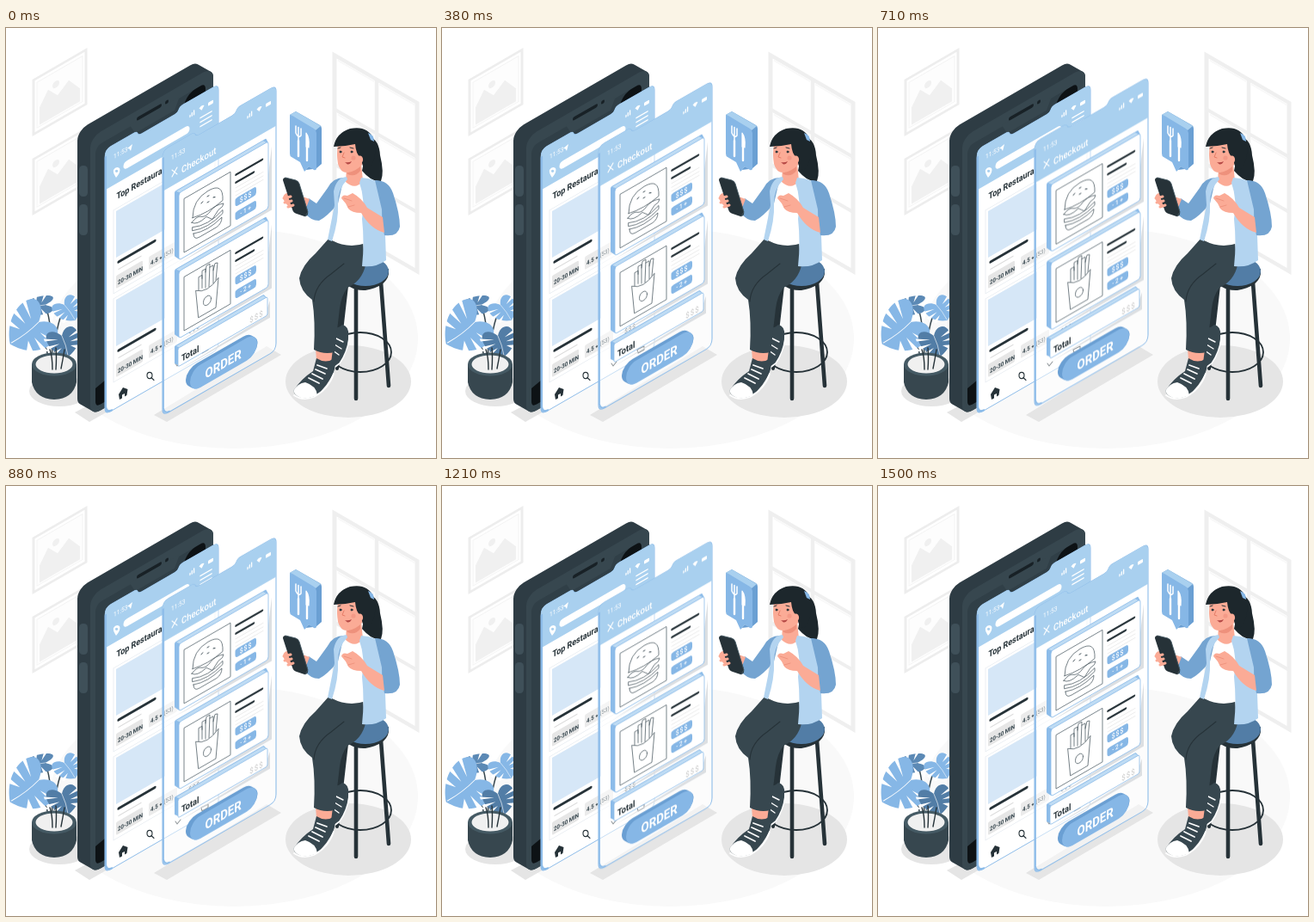
An HTML page for the animation above (1.54 s loop, 500 by 500 pixels).

```html
<!DOCTYPE html>
<html lang="en">
<head>
<meta charset="utf-8">
<title>Food order</title>
<style>
html, body { margin: 0; width: 100%; height: 100%; overflow: hidden; background: #fff; }
svg { display: block; width: 100vw; height: 100vh; }
text { font-family: Roboto, "Open Sans", sans-serif; }
.b { font-weight: 700; }
.m { font-weight: 500; }
.ln { fill: none; stroke-linecap: round; stroke-linejoin: round; }
.iso { transform: skewY(-30deg); }
.wall { transform: skewY(30deg); }
.float { animation: float 1540ms linear infinite; }
@keyframes float {
  0%, 97.2%, 100% { transform: translateY(0); }
  48.1% { transform: translateY(-10px); }
}
</style>
</head>
<body>
<svg viewBox="0 0 500 500">
<defs>
  <path id="shell" d="M115 217Q115 208 122 208H149Q152 208 153 211T158 214H196Q200 214 201 211T206 208H240Q247 208 247 215V508Q247 516 240 516H122Q115 516 115 508Z"/>
  <path id="head" d="M115 255V217Q115 208 122 208H149Q152 208 153 211T158 214H196Q200 214 201 211T206 208H240Q247 208 247 215V255Z"/>
  <g id="status">
    <text transform="matrix(.866 -.5 0 1 125 152.5)" font-size="7.6" fill="#fff">11:53</text>
    <g class="iso">
      <path d="M214 227V225M216.3 227V223.5M218.6 227V222" class="ln" stroke="#fff" stroke-width="1.3"/>
      <path d="M224.5 223Q227.5 220 230.5 223L227.5 227Z" fill="#fff"/>
      <rect x="235" y="222.5" width="6" height="4" rx="1" fill="#fff"/>
    </g>
  </g>
  <g id="place">
    <rect x="125" y="284" width="118" height="97" fill="#fff" stroke="#e6ebf0" stroke-width=".8"/>
    <rect x="128" y="287" width="57" height="54" fill="#d6e7f7"/>
    <path d="M131 347.5H173" class="ln" stroke="#263238" stroke-width="3.2"/>
    <path d="M131 356H157" class="ln" stroke="#dcdcdc" stroke-width="1.3"/>
    <rect x="128" y="362" width="31" height="15" rx="1.5" fill="#e6e6e6"/>
    <rect x="166" y="362" width="33" height="15" rx="1.5" fill="#ebebeb"/>
  </g>
  <g id="tags" fill="#37474f" font-size="7">
    <text class="b" transform="matrix(.866 -.5 0 1 130 298.5)">20-30 MIN</text>
    <text class="b" transform="matrix(.866 -.5 0 1 168 276)">4.5</text>
    <text transform="matrix(.866 -.5 0 1 178 270)" font-size="5">★</text>
    <text class="m" transform="matrix(.866 -.5 0 1 183.5 267)">(53)</text>
    <text transform="matrix(.866 -.5 0 1 213 352.5)" font-size="0"/>
  </g>
  <g id="card">
    <path d="M199 390H309V316L300 384Z" fill="#dcdfe2"/>
    <path d="M198 305H301L303 310V384H203L198 378Z" fill="#8dbce9" stroke="#8dbce9" stroke-width="4" stroke-linejoin="round"/>
    <path d="M198 304H299L304 309H203Z" fill="#bfdcf4"/>
    <rect x="201" y="308" width="104" height="78" rx="3" fill="#fff" stroke="#8dbce9" stroke-width=".7"/>
    <rect x="207" y="318" width="54" height="62.5" fill="#fff" stroke="#56656d" stroke-width=".7"/>
    <g class="ln">
      <path d="M267.5 325H298M267.5 334H288" stroke="#263238" stroke-width="2.5"/>
      <path d="M267 340H299M267 344.5H299M267 349H299" stroke="#e6e6e6" stroke-width=".9"/>
    </g>
    <rect x="266.500" y="352" width="24.500" height="10" rx="3" fill="#86b7e6"/>
    <rect x="266.500" y="368" width="24.500" height="10" rx="3" fill="#86b7e6"/>
  </g>
  <text id="price" class="m" font-size="8" text-anchor="middle" letter-spacing="1">$$$</text>
  <g id="leaf">
    <path d="M0 0C-9 -15 -27 -20 -30 -3C-32 14 -20 29 -2 38C18 32 32 18 30 2C28 -14 10 -16 0 0Z"/>
    <path d="M0 0Q2 18 -2 36" class="ln" stroke="#fff" stroke-width=".9"/>
    <path d="M-34 -6L-9 4L-34 -1ZM-35 9L-9 12L-34 15ZM-29 23L-8 20L-25 29ZM34 -2L11 6L34 4ZM34 12L11 14L32 18ZM25 25L9 21L19 31Z" fill="#fff"/>
  </g>
  <g id="picture">
    <path d="M32 79H93V142H32Z" fill="#fff" stroke="#ededed" stroke-width="3"/>
    <path d="M36 84H89V137H36Z" fill="#fdfdfd" stroke="#f4f4f4"/>
    <path d="M39 135V115L49 100L60 113L73 103L86 120V135Z" fill="#f0f0f0"/>
    <circle cx="58" cy="99" r="4" fill="#f0f0f0"/>
  </g>
</defs>

<!-- room -->
<ellipse cx="265" cy="361" rx="214" ry="128" fill="#f9f9f9"/>
<g class="iso"><use href="#picture"/><use href="#picture" y="92"/></g>
<g class="wall" fill="none" stroke="#efefef">
  <path d="M382 -189H478V7H382Z" stroke-width="5"/>
  <path d="M431 -188V6M382 -126H478M382 -62H478" stroke-width="4.5"/>
  <path d="M386 -185H428M434 -185H475M386 -122H428M434 -122H475" stroke="#f8f8f8" stroke-width="2"/>
</g>
<g fill="#e5e5e5">
  <ellipse cx="62" cy="422" rx="35" ry="18"/>
  <ellipse cx="398" cy="411" rx="73" ry="42"/>
  <path d="M80 447L97 458L190 405L172 398ZM172 450L187 458L320 380L303 370Z"/>
</g>

<!-- plant -->
<path d="M54 396Q54 345 46 323M56 394Q56 345 69 324M50 394Q49 368 36 352M61 394Q62 378 70 364" class="ln" stroke="#37474f" stroke-width="1.5"/>
<use href="#leaf" transform="translate(45 322) rotate(82) scale(.36 .8)" fill="#5b89b5"/>
<use href="#leaf" transform="translate(68 322) rotate(-38) scale(.52 .58)" fill="#86b7e6"/>
<use href="#leaf" transform="translate(38 342) rotate(50) scale(.96 1.1)" fill="#86b7e6"/>
<use href="#leaf" transform="translate(65 358) rotate(-20) scale(.62 .66)" fill="#527da6"/>
<path d="M30 391V412Q34 431 56 432Q78 431 82 412V391Z" fill="#37474f"/>
<ellipse cx="56" cy="391" rx="26" ry="13.5" fill="#455a64"/>
<ellipse cx="56" cy="391" rx="21.500" ry="10.500" fill="#f0f0f0"/>
<path d="M54 397Q54 382 51 374M58 397Q59 382 58 372M64 396Q66 386 68 374" class="ln" stroke="#263238" stroke-width="1.4"/>

<!-- phone -->
<g class="iso">
  <path d="M95 179H214L229 196V496H110L95 479Z" fill="#2e3c44" stroke="#2e3c44" stroke-width="24" stroke-linejoin="round"/>
  <rect x="98" y="184" width="143" height="324" rx="12" fill="#37474f"/>
  <rect x="104" y="198" width="128" height="303" rx="8" fill="#303f47"/>
  <path d="M220 198H226Q232 198 232 205V220H208V206Q213 198 220 198ZM104 479L116 476V501H110Q104 501 104 494Z" fill="#0d1215"/>
  <path d="M144 196H202L196 209H150Z" fill="#37474f"/>
  <path d="M154 194H179" class="ln" stroke="#182126" stroke-width="4"/>
  <circle cx="187" cy="194" r="2" fill="#182126"/>
</g>
<g fill="#3f5059">
  <rect x="85" y="160" width="10" height="36" rx="4.5"/>
  <rect x="85" y="205" width="10" height="36" rx="4.5"/>
</g>

<!-- list screen -->
<g class="iso">
  <use href="#shell" fill="#fff" stroke="#8dbce9" stroke-width="1"/>
  <use href="#head" fill="#a9d0ef"/>
  <path d="M116 217V508Q117 515 123 515.5" class="ln" stroke="#8dbce9" stroke-width="2.2"/>
  <path d="M141 240H209" class="ln" stroke="#fff" stroke-width="9"/>
  <path d="M226 235H239M226 240H239M226 245H239" class="ln" stroke="#fff" stroke-width="1.5"/>
  <use href="#place"/>
  <use href="#place" y="103"/>
</g>
<use href="#status"/>
<path d="M141 140L147 135L145 143L143.5 140.5Z" fill="#fff"/>
<path d="M128 174Q124 168 125 165Q128 160 132 163Q134 167 128 174Z" fill="#fff"/>
<circle cx="128.6" cy="166.3" r="1.6" fill="#a9d0ef"/>
<text class="b" transform="matrix(.866 -.5 0 1 128.5 199.5)" font-size="10.4" fill="#263238">Top Restaurants</text>
<use href="#tags"/>
<use href="#tags" y="103"/>
<use href="#price" transform="matrix(.8 -.46 0 .9 219 352)" fill="#37474f"/>
<path d="M131 426L136 418L141.5 420L140.5 427L138 428.5V425L135 426.5V430.5L132 432Z" fill="#263238"/>
<g class="ln" stroke="#263238" stroke-width="1.1">
  <ellipse cx="167" cy="404" rx="3" ry="3.6"/><path d="M169 406.5L172 409.5"/>
  <path d="M197 390L199 393L203 388M227 374L235 370V374L228 378Z"/>
</g>

<!-- checkout screen -->
<g class="float">
  <g transform="translate(67 1.3)">
    <g class="iso">
      <use href="#shell" fill="#fff" fill-opacity=".5" stroke="#8dbce9" stroke-width="1.1"/>
      <use href="#head" fill="#a9d0ef"/>
      <path d="M116 217V508Q117 515 123 515.5" class="ln" stroke="#8dbce9" stroke-width="1.8"/>
    </g>
    <use href="#status"/>
  </g>
  <path d="M193 165L199 170M193 173L199 162" class="ln" stroke="#fff" stroke-width="1.1"/>
  <text class="m" transform="matrix(.866 -.5 0 1 204 169)" font-size="11" fill="#fff">Checkout</text>
  <g class="iso">
    <use href="#card"/>
    <use href="#card" y="91"/>
    <g class="ln" stroke="#45545c" stroke-width=".65">
      <path d="M217 346Q217 325 235 325T252 346Q235 351 217 346ZM216 351Q222 346 228 351Q233 354 238 350T253 350Q253 354 247 354L240 361L233 354Q222 358 216 351ZM217 357Q235 366 252 357V361Q235 369 217 361ZM218 365Q235 372 251 365Q251 372 245 373H225Q218 373 218 365Z"/>
      <path d="M227 335L229 334M234 331L236 331M241 336L243 337M234 338L236 338" stroke-width="1"/>
      <path d="M224 434V419H228V434M228 423V414H232V436M232 418L233 411H237L236 437M237 415H241V436M241 421L243 414L246 415L244 434"/>
      <path d="M221 433Q234 444 247 433L244 466H224Z" fill="#fff"/>
      <ellipse cx="234" cy="452" rx="4.5" ry="5.2"/>
    </g>
    <path d="M199 514H307V494L300 510Z" fill="#dcdfe2"/>
    <path d="M197 484H299L303 490V508H202L197 503Z" fill="#8dbce9" stroke="#8dbce9" stroke-width="2" stroke-linejoin="round"/>
    <path d="M198 484H299L303 488.500H202Z" fill="#bfdcf4"/>
    <rect x="200" y="488" width="104" height="21.500" rx="2" fill="#fff" stroke="#8dbce9" stroke-width=".7"/>
    <path d="M221.500 530.500H276L280 535H225.500Z" fill="#6a9fd3" stroke="#6a9fd3" stroke-width="25" stroke-linejoin="round"/>
    <rect x="214" y="522" width="78" height="26.500" rx="12" ry="13.200" fill="#86b7e6"/>
  </g>
  <g fill="#fff">
    <use href="#price" transform="matrix(.866 -.5 0 1 279 199)"/>
    <use href="#price" transform="matrix(.866 -.5 0 1 279 290)"/>
    <g class="m" font-size="7.5" text-anchor="middle">
      <text transform="matrix(.866 -.5 0 1 278.5 214.500)">- 1 +</text>
      <text transform="matrix(.866 -.5 0 1 278.5 305.500)">- 2 +</text>
    </g>
    <text class="b" transform="matrix(.866 -.5 0 1 231.5 408)" font-size="15.4">ORDER</text>
  </g>
  <text class="b" transform="matrix(.866 -.5 0 1 204 388)" font-size="10.6" fill="#263238">Total</text>
  <use href="#price" transform="matrix(.98 -.566 0 1.13 291.5 338.5)" fill="#d4d4d4"/>
</g>

<!-- bubble -->
<path d="M330 101L337 97L365 113Q367 114 367 117V158L360 164Z" fill="#6a9fd3"/>
<path d="M330 101L337 97L366 114L360 119Z" fill="#a9d0ef"/>
<path d="M330 103Q330 100 333 102L358 117Q361 119 361 122V163Q361 166 358 165L352 161L347 167L342 156L332 150Q330 149 330 146Z" fill="#86b7e6"/>
<path d="M347 167L352 161L357 164L349 165Z" fill="#6a9fd3"/>
<g class="ln" stroke="#fff">
  <path d="M337 114V122Q340 129 343 125V117M340 115.5V149" stroke-width="1.5"/>
  <path d="M340 131V149" stroke-width="2.4"/>
  <path d="M349 122Q353 127 352 139L349 138Z" fill="#fff" stroke-width="1.2"/>
  <path d="M350 138V154" stroke-width="2.4"/>
</g>

<!-- stool -->
<g class="ln" stroke="#263238">
  <path d="M396 300L385 396" stroke-width="4"/>
  <ellipse cx="412" cy="377" rx="36" ry="23" stroke-width="1.800"/>
  <path d="M436 296L445 416M407 302V431" stroke-width="4.6"/>
</g>
<path d="M391 284V289Q397 306 418 305Q442 301 445 286V280Z" fill="#263238"/>
<ellipse cx="418" cy="283" rx="27" ry="17" fill="#527da6"/>

<!-- woman -->
<path d="M384 302L397 290L390 350L379 350Z" fill="#263238"/>
<path d="M379 348Q386 350 391 345Q399 347 398 357Q399 373 391 385Q386 395 379 395L374 378Z" fill="#37474f"/>
<path d="M399 361Q397 377 388 390L380 396" class="ln" stroke="#fff" stroke-width="1.6"/>
<path d="M384 361L392 365M382 368L390 373M380 375L387 380" class="ln" stroke="#fff" stroke-width="1.4"/>
<path d="M360 372L380 374L378 389Q368 392 361 387Z" fill="#fbab96"/>
<path d="M376 244Q396 254 415 249L418 276Q414 294 397 302Q390 311 388 326L382 377Q369 380 358 374Q360 340 356 316Q342 306 341 291Q344 276 360 262Z" fill="#37474f"/>
<path d="M358 318Q359 299 378 286L393 274" class="ln" stroke="#263238" stroke-width="1.1"/>
<path d="M334 422Q343 408 357 399L361 384Q372 391 382 384Q385 396 377 408Q368 424 355 430Q338 433 334 422Z" fill="#37474f"/>
<path d="M334 422Q339 413 348 412Q361 416 362 427Q340 436 334 422Z" fill="#fff"/>
<path d="M335 427Q345 434 358 429Q375 420 381 402" class="ln" stroke="#fff" stroke-width="1.8"/>
<path d="M352 407L364 413M356 402L368 408M360 397L371 402M362 392L373 396" class="ln" stroke="#fff" stroke-width="1.7"/>

<path d="M422 126Q434 130 435 148Q440 168 436 178Q426 180 414 166Z" fill="#1d272c"/>
<path d="M392 178L404 186L416 176L419 250Q398 257 379 247Q383 222 384 200Z" fill="#fff"/>
<path d="M396 162L413 157L415 178Q406 189 395 179Z" fill="#fbab96"/>
<path d="M396 166Q405 168 412 160L412 166Q406 174 397 170Z" fill="#ee917c"/>
<path d="M393 174Q380 174 374 186L361 204L352 198L346 214Q354 224 364 224Q374 219 386 204Z" fill="#74a4d1"/>
<path d="M396 173Q384 174 381 190L382 206L374 246L379 248Q387 224 386 204Q386 187 397 176Z" fill="#b3d4f0"/>
<path d="M413 174Q430 175 439 184L442 270Q430 279 414 277Q417 250 414 222Q418 200 411 180Z" fill="#b3d4f0"/>
<path d="M429 177Q445 177 450 192Q458 216 458 231Q456 243 440 241Q437 228 437 211Z" fill="#74a4d1"/>
<path d="M440 238Q424 234 413 215Q402 215 398 210L395 204L390 198Q391 193 397 195L403 192Q414 198 420 209L438 220Z" fill="#fbab96"/>
<path d="M393 198L402 201M398 208L405 206" class="ln" stroke="#ee917c" stroke-width=".9"/>
<path d="M322 197Q324 190 334 192L345 196L353 199L347 214L338 210Q325 209 322 197Z" fill="#fbab96"/>
<path d="M322 177Q322 174 325 174L337 177Q340 178 341 181L351 213Q352 219 347 219L338 216Q334 215 333 211Z" fill="#263238"/>
<path d="M325 174L337 177Q340 178 341 181L351 214L348 219" class="ln" stroke="#455a64" stroke-width=".9"/>
<path d="M323 198L331 196M324 203L332 201M328 208L334 206" class="ln" stroke="#fbab96" stroke-width="3"/>

<path d="M386 134Q384 147 386 158Q389 169 398 168Q408 166 415 158L414 134Z" fill="#fbab96"/>
<path d="M381 138Q384 122 400 117Q420 113 427 128Q433 144 425 160Q421 167 416 164L412 150Q407 147 406 135Q393 138 381 138Z" fill="#1d272c"/>
<ellipse cx="411.500" cy="153" rx="3.6" ry="4.6" fill="#fbab96"/>
<path d="M421 122Q428 124 428 132L424 130Z" fill="#86b7e6"/>
<g class="ln" stroke="#263238" stroke-width="1">
  <circle cx="389" cy="144" r="1" fill="#263238"/><circle cx="402" cy="144" r="1" fill="#263238"/>
  <path d="M386 140L389 139M400 139L404 140"/>
</g>
<path d="M393 145L391 150L394 151" class="ln" stroke="#e47863" stroke-width=".9"/>
<path d="M394 156Q398 157 402 155Q400 159 397 158.500Z" fill="#b64a46"/>
<circle cx="404" cy="151" r="2.6" fill="#f0907d" opacity=".6"/>
</svg>
</body>
</html>
```
